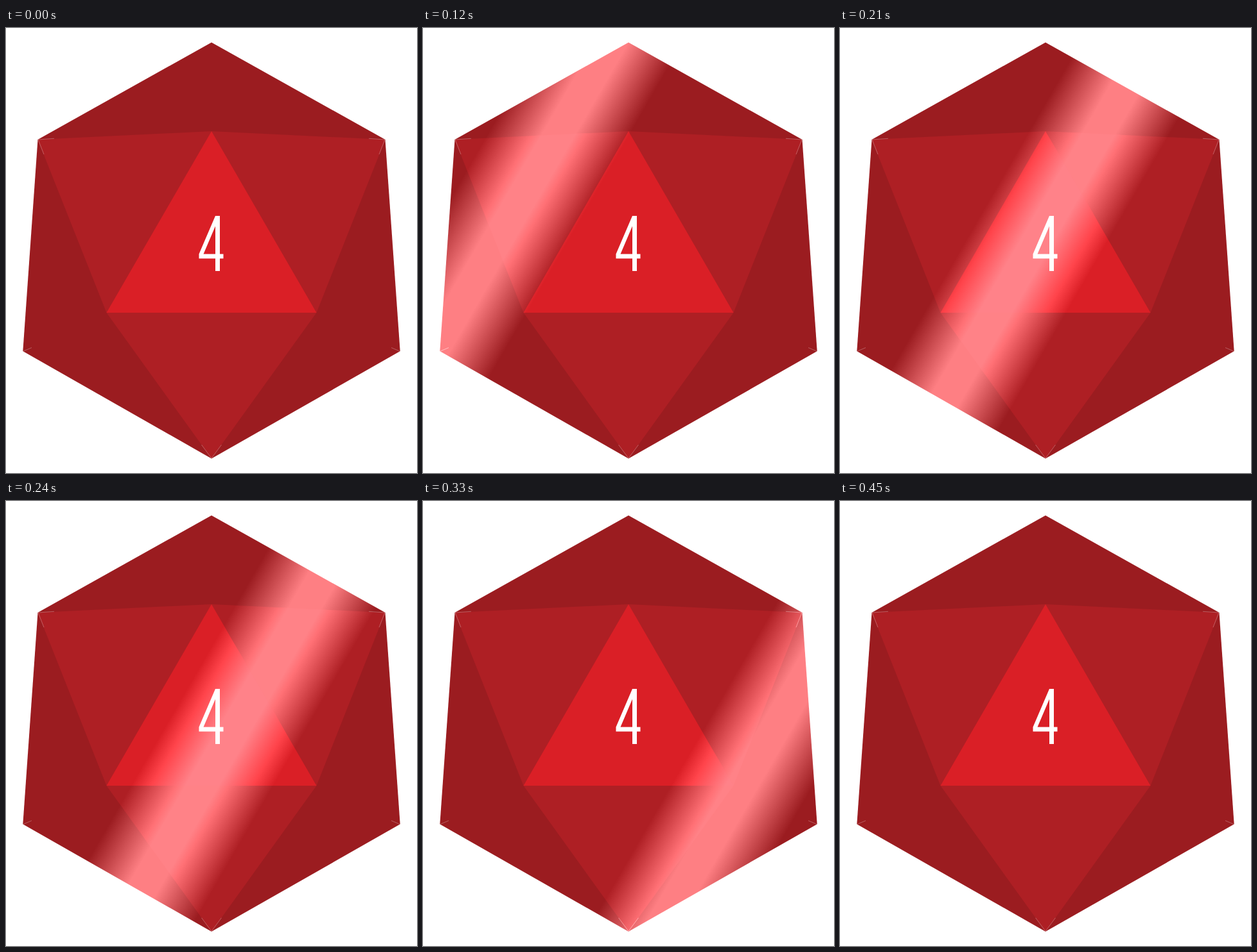
Animation of 640x694 px, one loop 4.5 s. Source, as an HTML page:

```html
<!DOCTYPE html>
<html lang="en">
<head>
<meta charset="utf-8">
<title>Shining die</title>
<style>
  html, body { margin: 0; width: 100%; height: 100%; overflow: hidden; background: #fff; }
  svg { display: block; width: 100%; height: 100%; isolation: isolate; }
  #shine { mix-blend-mode: plus-lighter; }
</style>
</head>
<body>
<svg viewBox="0 0 640 694" role="img" aria-label="Twenty-sided die showing 4">
  <defs>
    <linearGradient id="band" gradientUnits="userSpaceOnUse" x1="-96" y1="0" x2="96" y2="0">
      <stop offset="0" stop-color="#fff" stop-opacity="0"/>
      <stop offset=".385" stop-color="#fff" stop-opacity=".39"/>
      <stop offset=".615" stop-color="#fff" stop-opacity=".39"/>
      <stop offset="1" stop-color="#fff" stop-opacity="0"/>
    </linearGradient>
    <path id="outline" d="M320 22.5 590.5 174 613.7 504 320 671.5 26.3 504 49.5 174Z"/>
  </defs>
  <rect width="640" height="694" fill="#fff"/>
  <use href="#outline" fill="#9b1c20"/>
  <path fill="#ae1f24" d="M49.5 174 320 161 590.5 174 483.5 444 320 671.5 156.5 444Z"/>
  <path fill="#da1f26" d="M320 161 483.5 444H156.5Z"/>
  <!-- hairline gaps where the facets meet -->
  <path fill="none" stroke="#fff" stroke-opacity=".4" stroke-width=".7"
        d="M75 172.3 50 174 59 197M565 172.3 590 174 581 197M40 498.5 27 504M600 498.5 613 504M304.5 650 320 671 335.5 650"/>
  <use id="shine" href="#outline" fill="url(#band)"/>
  <path fill="#fff" fill-rule="evenodd"
        d="M326 293H333V352.5H338.5V359.5H333V379H326V359.5H300.5V352.5ZM326 309V352.5H307.5Z"/>
</svg>
<script>
  const LOOP = 4500, STEP = 30, SWEEP_STEPS = 15;
  const START = 45, SPEED = 55.2; // band centre along its 30° axis, px and px per step
  const band = document.getElementById('band');
  const shine = document.getElementById('shine');

  function draw(time) {
    const step = Math.floor(time % LOOP / STEP);
    const visible = step > 0 && step < SWEEP_STEPS;
    shine.style.display = visible ? '' : 'none';
    if (visible) {
      band.setAttribute('gradientTransform', `rotate(30) translate(${START + SPEED * step} 0)`);
    }
  }

  const begin = performance.now();
  function tick() {
    draw(performance.now() - begin);
    requestAnimationFrame(tick);
  }
  tick();
</script>
</body>
</html>
```
